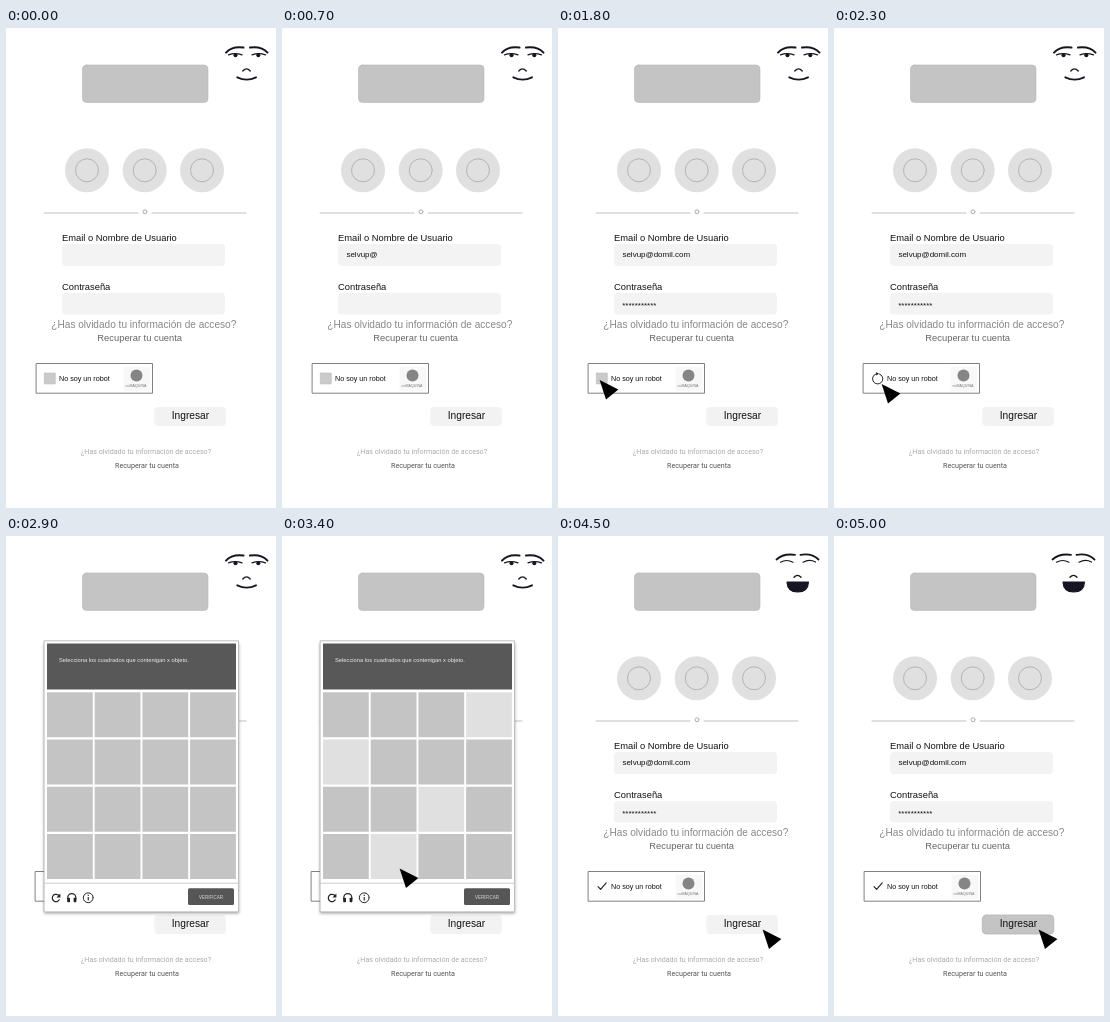
An HTML page with a canvas for the animation above (5500 ms loop, 270 px wide and 480 px high).

```html
<!DOCTYPE html>
<html lang="es">
<head>
<meta charset="utf-8">
<title>Ingresar</title>
<style>
  html, body { margin: 0; width: 100%; height: 100%; overflow: hidden; background: #fff; }
  canvas { display: block; width: 270px; height: 480px; }
</style>
</head>
<body>
<canvas id="stage"></canvas>
<script>
const W = 270, H = 480, LOOP = 5500;
const SANS = '"Liberation Sans", Arial, sans-serif';
const ROBOTO = 'Roboto, Arial, sans-serif';
const INK = '#161622', GREY = '#c4c4c4', PALE = '#e0e0e0';
const EMAIL = 'selvup@domil.com';

// Each step holds until the next one starts.
const base = { typed: EMAIL.length, secret: 11, mark: 'box', shift: 0 };
const steps = [
  { at: 0, typed: 0, secret: 0 },
  { at: 700, typed: 7, secret: 0 },
  { at: 1300, cursor: [107, 275.5] },
  { at: 1800, cursor: [41, 351.5] },
  { at: 2300, cursor: [47, 355.5], mark: 'spin', shift: -1 },
  { at: 2900, popup: true, shift: -1 },
  { at: 3400, popup: true, shift: -1, picked: true, cursor: [117, 332] },
  { at: 3900, popup: true, shift: -1, picked: true, verify: true, cursor: [211, 360] },
  { at: 4500, mark: 'check', happy: true, cursor: [204, 393] },
  { at: 5000, mark: 'check', happy: true, pressed: true, cursor: [204, 393] }
].map(s => ({ ...base, ...s }));

const canvas = document.getElementById('stage');
const ctx = canvas.getContext('2d');
const dpr = window.devicePixelRatio || 1;
canvas.width = W * dpr;
canvas.height = H * dpr;

function rect(x, y, w, h, r, fill, stroke, lw = 1) {
  ctx.beginPath();
  ctx.roundRect(x, y, w, h, r);
  paint(fill, stroke, lw);
}

function circle(x, y, r, fill, stroke, lw = 1) {
  ctx.beginPath();
  ctx.arc(x, y, r, 0, Math.PI * 2);
  paint(fill, stroke, lw);
}

function paint(fill, stroke, lw) {
  if (fill) { ctx.fillStyle = fill; ctx.fill(); }
  if (stroke) { ctx.strokeStyle = stroke; ctx.lineWidth = lw; ctx.stroke(); }
}

function path(d, fill, stroke, lw = 1) {
  const p = new Path2D(d);
  if (fill) { ctx.fillStyle = fill; ctx.fill(p); }
  if (stroke) { ctx.strokeStyle = stroke; ctx.lineWidth = lw; ctx.stroke(p); }
}

function text(str, x, y, size, color = '#111', font = SANS, align = 'left') {
  ctx.font = `${size}px ${font}`;
  ctx.textAlign = align;
  ctx.fillStyle = color;
  ctx.fillText(str, x, y);
}

function face(happy) {
  if (happy) {
    path('M218.5 23.5Q225 17.3 237 18.8M242.5 18.8Q254 17 260.5 23.5', null, INK, 1.8);
    path('M222.5 26.2Q228.5 22.8 235 26.2M245 26.2Q251.5 22.8 257.5 26', null, INK, 1.2);
    path('M236 41.2Q239.5 37.6 243 41.2', null, INK, 1.4);
    path('M229 46H250.5Q250 56 239.7 56Q229.5 56 229 46Z', INK, INK, 1.2);
    return;
  }
  path('M220 24.6Q226 18 237.5 19.6M244 19.6Q255.5 18 261.5 24.6', null, INK, 2);
  path('M222.5 26.8Q229 24.4 236 26.8M246 26.8Q252.5 24.4 259.5 26.8', null, INK, 1.3);
  circle(229.5, 27.2, 2, INK);
  circle(252.3, 27.2, 2, INK);
  path('M236.8 43Q240.5 38.8 244.2 43', null, INK, 1.4);
  path('M231.3 49.3Q240.7 54 250 49.3', null, INK, 1.9);
}

function recheck(s) {
  ctx.save();
  ctx.translate(s.shift, 0);
  rect(30.5, 335.5, 116, 29.7, 0, '#fff', '#808080', 1);
  rect(117.5, 339, 27, 24, 0, '#f8f8f8');
  circle(130.5, 347.5, 6, '#858585');
  text('noMAQUINA', 130, 359, 3.6, '#777', SANS, 'center');
  ctx.restore();
  text('No soy un robot', 53, 353, 7.2);
  if (s.mark === 'box') {
    rect(38.3, 345, 11, 11, 0.5, '#cacaca', '#bcbcbc', 0.6);
  } else if (s.mark === 'spin') {
    ctx.beginPath();
    ctx.arc(43.7, 350.8, 5.1, -1.2, 4.4);
    paint(null, '#222', 1);
    path('M42.2 344L45 345.8L42.2 347.6Z', '#222');
  } else {
    path('M40 350.6L42.6 353.4L48.2 346.8', null, '#222', 1.1);
  }
}

function form(s) {
  rect(76.5, 37, 125.5, 37.5, 4, GREY, '#b8b8b8', 0.6);

  for (const x of [81, 138.7, 196]) {
    circle(x, 142.3, 22, PALE);
    circle(x, 142.3, 11.5, null, '#b4b4b4', 1);
  }

  path('M38 185H132M146 185H240', null, '#c0c0c0', 1);
  circle(139, 183.8, 2, null, '#999', 0.8);

  text('Email o Nombre de Usuario', 56, 213, 9.36);
  rect(56, 216, 163, 22, 4, '#f3f3f3');
  text(EMAIL.slice(0, s.typed), 64.4, 229, 8);

  text('Contraseña', 56, 262.2, 9.36);
  rect(56, 265, 163, 21.5, 4, '#f3f3f3');
  text('*'.repeat(s.secret), 64.2, 279.6, 8);

  text('¿Has olvidado tu información de acceso?', 137.8, 300.4, 10.09, '#888', SANS, 'center');
  text('Recuperar tu cuenta', 133.7, 313.3, 9.36, '#666', SANS, 'center');

  recheck(s);

  rect(148.3, 379, 71.5, 19, 4, s.pressed ? GREY : '#f2f2f2', s.pressed ? '#b4b4b4' : null, 0.8);
  text('Ingresar', 184.4, 391, 10.2, '#111', SANS, 'center');

  text('¿Has olvidado tu información de acceso?', 140, 425.5, 7.12, '#aaa', ROBOTO, 'center');
  text('Recuperar tu cuenta', 141, 440, 7.16, '#555', ROBOTO, 'center');
}

function popup(s) {
  ctx.save();
  ctx.shadowColor = 'rgba(0,0,0,.35)';
  ctx.shadowBlur = 3 * dpr;
  ctx.shadowOffsetY = 2 * dpr;
  rect(38, 104.5, 195, 271.5, 0, '#fff');
  ctx.restore();
  rect(38.5, 104.8, 194, 271, 0, null, '#b0b0b0', 0.8);

  rect(41, 107.5, 189, 46, 0, '#585858');
  text('Selecciona los cuadrados que contenigan x objeto.', 53, 126, 5.76, '#ececec');

  const picks = [3, 0, 2, 1];
  for (let row = 0; row < 4; row++) {
    for (let col = 0; col < 4; col++) {
      const on = s.picked && picks[row] === col;
      rect(41 + col * 47.7, 156.3 + row * 47.2, 45.8, 45, 0, on ? PALE : GREY);
    }
  }

  path('M38.5 347.2H232.5', null, '#c8c8c8', 0.9);

  // reload
  ctx.beginPath();
  ctx.arc(50, 362, 3.7, 0.5, 5.5);
  paint(null, '#222', 1.2);
  path('M54.4 357.6V361.6H50.4Z', '#222');

  // headphones
  path('M61.8 363V361.6A4 4 0 0 1 69.8 361.6V363', null, '#222', 1.2);
  rect(61.2, 361.8, 2.8, 4.4, 0.8, '#222');
  rect(67.6, 361.8, 2.8, 4.4, 0.8, '#222');

  // info
  circle(82.2, 361.8, 4.9, null, '#222', 1);
  rect(81.7, 361, 1.1, 3.6, 0, '#222');
  rect(81.7, 358.8, 1.1, 1.1, 0, '#222');

  if (s.verify) rect(182.5, 352.8, 45, 16, 1.5, '#606060', '#222', 1.6);
  else rect(182, 352.3, 46, 16.7, 1.5, '#565656');
  text('VERIFICAR', 205, 362.6, 4.5, '#ddd', SANS, 'center');
}

function pointer([x, y]) {
  ctx.save();
  ctx.translate(x, y);
  path('M0.6 0.6L19.4 10L7 20Z', '#000');
  ctx.restore();
}

function draw(now) {
  const t = now % LOOP;
  const s = steps.findLast(step => step.at <= t) || steps[0];
  ctx.setTransform(dpr, 0, 0, dpr, 0, 0);
  ctx.lineCap = 'round';
  ctx.lineJoin = 'round';
  ctx.fillStyle = '#fff';
  ctx.fillRect(0, 0, W, H);
  form(s);
  face(s.happy);
  if (s.popup) popup(s);
  if (s.cursor) pointer(s.cursor);
}

const start = performance.now();
function tick() {
  draw(performance.now() - start);
  requestAnimationFrame(tick);
}
tick();
</script>
</body>
</html>
```
